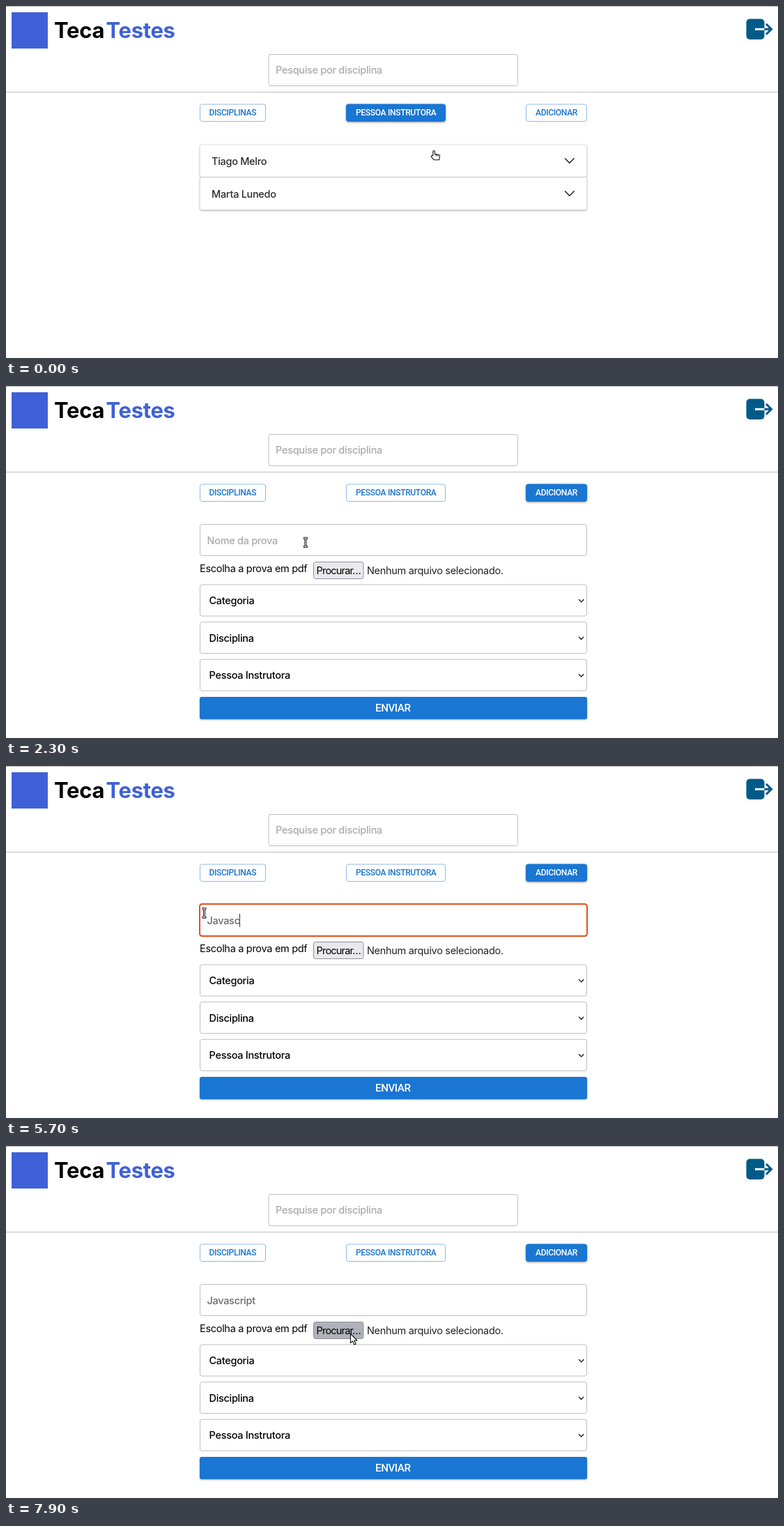
Write an HTML page that moves like this. It is 1108 px wide and 505 px high and loops after 8 s.

```html
<!DOCTYPE html>
<html lang="pt-BR">
<head>
<meta charset="utf-8">
<style>
  html, body { margin: 0; width: 100%; height: 100%; overflow: hidden; background: #fff; }
  svg { display: block; }
  text { font: 400 14.5px Inter, sans-serif; letter-spacing: -.3px; white-space: pre; }
  .medium { font-weight: 500; }
  .hint { fill: #aaa; }
  .title { font-size: 31px; font-weight: 700; letter-spacing: -.3px; }
  .caps { font: 500 12.1px Roboto, sans-serif; letter-spacing: -.03em; }
  .box { fill: #fff; stroke: #bdbdbd; }
  .raised { filter: drop-shadow(0 1px 1px #0005); }
  .line { fill: none; stroke: #111; stroke-width: 1.3; stroke-linecap: round; stroke-linejoin: round; }
  .tab rect { fill: #fff; stroke: #8cbae8; }
  .tab text { fill: #1976d2; }
  .tab.on rect { fill: #1976d2; stroke: #1976d2; filter: drop-shadow(0 1.5px 1.5px #0006); }
  .tab.on text { fill: #fff; }
  .pointer { fill: #fff; stroke: #111; stroke-width: 1.1; stroke-linejoin: round; }
</style>
</head>
<body>
<svg width="1108" height="505" viewBox="0 0 1108 505">
  <path d="M0 .5H1108M0 123.5H1108" stroke="#bdbdbd"/>
  <rect x="8" y="9" width="52" height="52" fill="#3f61d7"/>
  <text class="title" x="69" y="46">Teca</text>
  <text class="title" x="143.5" y="46" fill="#3f61d7">Testes</text>

  <rect x="1062.5" y="18.5" width="26" height="29.5" rx="5" fill="#005a87"/>
  <g fill="none" stroke-width="3">
    <path d="M1075 33.3H1088.5" stroke="#fff"/>
    <path d="M1088.5 33.3H1098M1091 25.8L1098.5 33.3L1091 40.8" stroke="#005a87"/>
  </g>

  <rect class="box" x="377" y="69.5" width="357.5" height="45" rx="3"/>
  <text class="medium hint" x="387" y="96.5">Pesquise por disciplina</text>

  <g id="tabs"></g>

  <g id="list">
    <g class="raised" fill="#fff" stroke="#e2e2e2" stroke-width=".8">
      <rect x="278.5" y="199" width="555" height="46" rx="2"/>
      <rect x="278.5" y="246" width="555" height="46.3" rx="2"/>
    </g>
    <g fill="#2b2b2b">
      <text class="medium" x="295" y="227.5">Tiago Melro</text>
      <text class="medium" x="295" y="274.5">Marta Lunedo</text>
    </g>
    <path class="line" d="M802.5 218.8L808.8 225.2L815.2 218.8M802.5 265.8L808.8 272.2L815.2 265.8"/>
  </g>

  <g id="form">
    <rect class="box" x="278.5" y="198.5" width="555" height="45" rx="3"/>
    <rect id="ring" x="278" y="198" width="556" height="46" rx="3.5" fill="none" stroke="#e2501f" stroke-width="2"/>
    <text id="field" class="medium" x="288.5" y="226.5"></text>
    <path id="caret" d="M.5 212V231" stroke="#333"/>
    <text x="278" y="267">Escolha a prova em pdf</text>
    <rect id="browse" x="441.5" y="252.5" width="71.5" height="24" rx="3" stroke="#8f8f9d"/>
    <text x="445.5" y="269.5" style="letter-spacing:-.8px">Procurar…</text>
    <text x="518" y="269.5" fill="#222">Nenhum arquivo selecionado.</text>
    <g id="selects"></g>
    <rect class="raised" x="278" y="446" width="556" height="32" rx="3" fill="#1976d2"/>
    <text class="caps" x="530" y="467" fill="#fff" style="font-size:15.2px">ENVIAR</text>
  </g>

  <g id="tooltip">
    <rect x="284" y="235" width="142" height="27" rx="4" fill="#2b2b2b"/>
    <text x="355" y="253" fill="#fff" text-anchor="middle" style="font-size:12.5px">Preencha este campo.</text>
  </g>

  <g id="cursor">
    <path id="hand" class="pointer" d="M-1.2 6.6V.8a1.3 1.3 0 0 1 2.6 0V4.4l5.4.8q1.9.4 1.7 2.2l-.8 5.4H.4L-3.6 8.4q-.3-1.6 1.2-1.8zM3.4 5v2.4M5.8 5.4v2.2"/>
    <g id="beam" fill="none">
      <path d="M-3 -6.2H3M0 -6.2V6.2M-3 6.2H3" stroke="#111" stroke-width="3"/>
      <path d="M-2.4 -6.2H2.4M0 -6.2V6.2M-2.4 6.2H2.4" stroke="#fff" stroke-width="1"/>
    </g>
    <path id="arrow" class="pointer" d="M.5 .5V13.5L3.6 10.8L5.9 16L8.2 15L5.9 10H10z"/>
  </g>
</svg>
<script>
const LOOP = 8000, STEP = 100;
const $ = id => document.getElementById(id);
const show = (id, on) => $(id).style.display = on ? '' : 'none';

$('tabs').innerHTML = [
  ['DISCIPLINAS', 278.5, 94, 291.5],
  ['PESSOA INSTRUTORA', 488.5, 142, 502],
  ['ADICIONAR', 746.5, 87, 760],
].map(([label, x, width, textX]) => `<g class="tab">
  <rect x="${x}" y="141" width="${width}" height="24.5" rx="3"/>
  <text class="caps" x="${textX}" y="157.3">${label}</text></g>`).join('');

$('selects').innerHTML = ['Categoria', 'Disciplina', 'Pessoa Instrutora'].map((label, i) => {
  const y = 285 + i * 53.6;
  return `<rect class="box" x="278.5" y="${y}" width="555" height="45" rx="3"/>
    <text class="medium" x="291.5" y="${y + 28}">${label}</text>
    <path class="line" d="M822.5 ${y + 21.5}l3.2 3.4l3.2 -3.4"/>`;
}).join('');

// Pointer hotspot: time, x, y
const path = [
  [0, 614, 208], [900, 778.5, 149.8], [1500, 778.5, 149.8], [2400, 417.5, 227],
  [3100, 417.5, 227], [3400, 284.5, 211], [7000, 284.5, 211],
  [7100, 290.5, 209], [7600, 489, 274], [7900, 494, 269],
];
const typing = [4400, 4700, 4900, 5100, 5400, 5700, 5900, 6100, 6300, 6400];

function pointerAt(t) {
  const i = path.findIndex(p => p[0] > t);
  if (i < 0) return path.at(-1).slice(1);
  const [t0, x0, y0] = path[i - 1], [t1, x1, y1] = path[i];
  const u = (t - t0) / (t1 - t0), k = u * u * (3 - 2 * u);
  return [x0 + (x1 - x0) * k, y0 + (y1 - y0) * k];
}

const inside = (x, y, left, top, right, bottom) => x >= left && x <= right && y >= top && y <= bottom;

function pointerKind(x, y, adding) {
  if (inside(x, y, 746, 141, 834, 166) || inside(x, y, 488, 141, 630, 166)) return 'hand';
  if (!inside(x, y, 278, 198, 834, adding ? 244 : 293)) return 'arrow';
  return adding ? 'beam' : 'hand';
}

function draw(t) {
  const adding = t >= 1200, pressed = t >= 7900;
  const focused = t >= 2700 && !pressed;
  const tip = t >= 3900 && t < 4400;
  const [x, y] = pointerAt(t);

  [...$('tabs').children].forEach((tab, i) => tab.classList.toggle('on', i === (adding ? 2 : 1)));
  show('list', !adding);
  show('form', adding);
  show('ring', focused);
  show('tooltip', tip);

  const typed = 'Javascript'.slice(0, typing.filter(at => at <= t).length);
  const field = $('field');
  field.textContent = typed || 'Nome da prova';
  field.setAttribute('fill', typed ? '#6b6b6b' : '#aaa');
  const caretX = 288.5 + (typed ? field.getComputedTextLength() : 0);
  $('caret').setAttribute('transform', `translate(${Math.floor(caretX)})`);
  show('caret', focused && !tip);

  const hover = inside(x, y, 441, 252, 513, 277);
  $('browse').setAttribute('fill', pressed ? '#b1b1b9' : hover ? '#d0d0d7' : '#e9e9ed');

  const kind = pointerKind(x, y, adding);
  for (const id of ['hand', 'beam', 'arrow']) show(id, id === kind);
  $('cursor').setAttribute('transform', `translate(${x} ${y})`);
}

function tick() {
  draw(Math.floor(performance.now() % LOOP / STEP) * STEP);
  requestAnimationFrame(tick);
}
tick();
</script>
</body>
</html>
```
